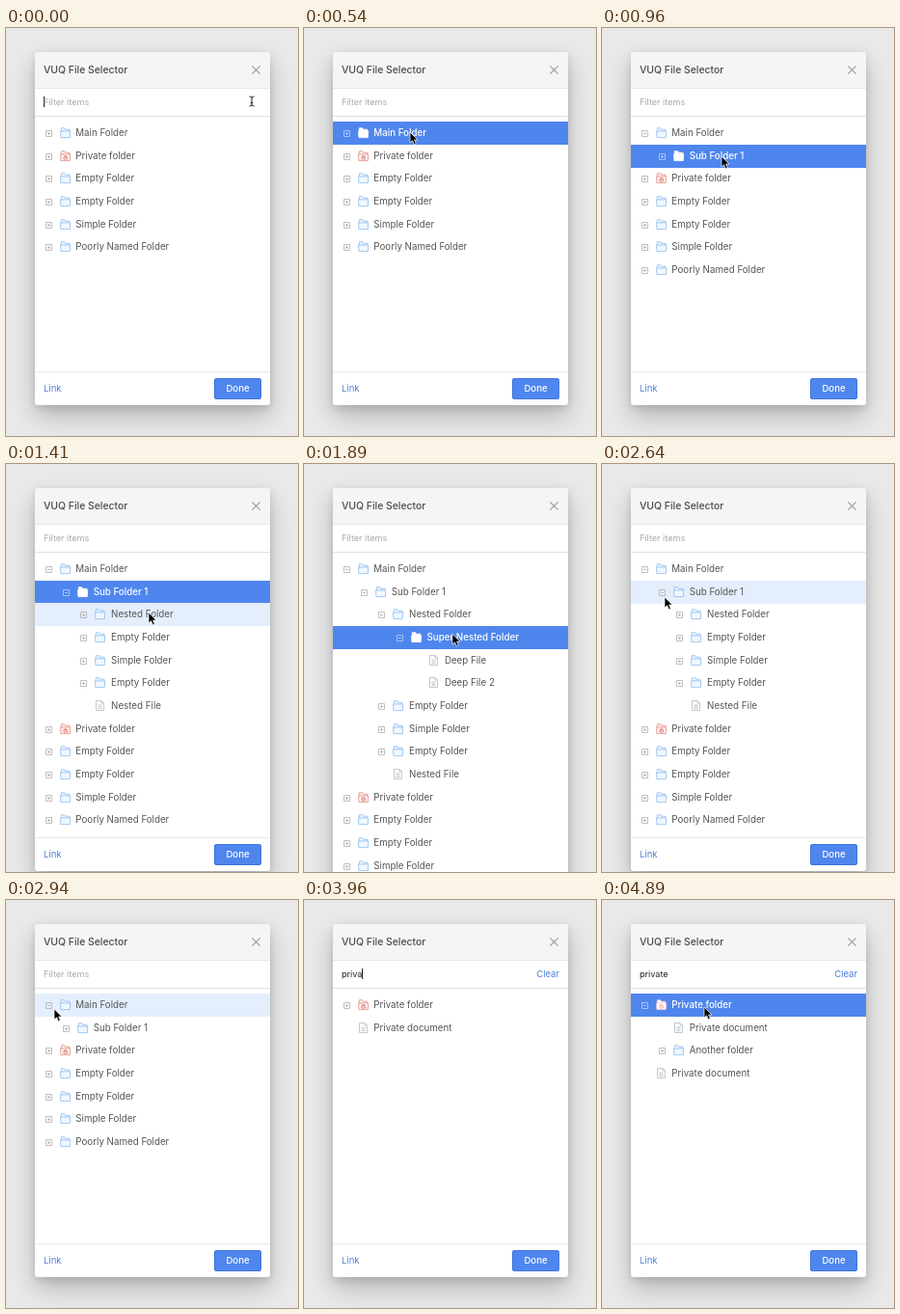
These frames come from a looping animation (303x423 px, 4.92 s). An HTML page:

```html
<!DOCTYPE html>
<html lang="en">
<head>
<meta charset="utf-8">
<title>File selector</title>
<style>
  html, body { margin: 0; width: 100%; height: 100%; overflow: hidden; background: #e9e9e9; }
  body { position: relative; font: 9.75px Inter, "Open Sans", sans-serif; color: #545454; cursor: default; }
  div, svg { position: absolute; }
  span { white-space: pre; }
  #panel {
    left: 30px; top: 25px; width: 244px; background: #fff; border-radius: 3px;
    box-shadow: 0 12px 26px rgba(0,0,0,.21), 0 3px 8px rgba(0,0,0,.12);
  }
  #head {
    left: 30px; top: 25px; width: 235px; height: 37px; padding-left: 9px; box-sizing: content-box;
    background: #f5f5f5; border-bottom: 1px solid #e6e6e6; border-radius: 3px 3px 0 0;
    font-size: 10.4px; font-weight: 500; line-height: 37px; color: #4c4c4c;
  }
  #field {
    left: 30px; top: 63px; width: 235px; height: 28px; padding-left: 9px;
    border-bottom: 1px solid #e1e1e1; line-height: 27px; font-size: 9.1px; color: #222;
  }
  #field .hint { color: #a9a9a9; }
  #caret { display: inline-block; width: 1px; height: 11px; margin-right: -1px; vertical-align: -2px; background: #222; }
  .link { color: #4a80d8; font-size: 9.5px; }
  #clear { right: 9px; top: 0; }
  .row { left: 30px; width: 244px; height: 24px; line-height: 23px; }
  .row span { position: absolute; top: 0; }
  .row.hover { background: #e4eefd; }
  .row.on { background: #4f86ee; color: #fff; font-weight: 500; }
  #foot { left: 30px; width: 244px; height: 34px; border-top: 1px solid #e8e8e8; }
  #foot .link { left: 9px; top: 0; line-height: 34px; }
  #done {
    left: 186px; top: 6px; width: 47px; height: 20px; border: 1px solid #3f76df; border-radius: 2px;
    background: #4f86ee; color: #fff; font-size: 9.6px; font-weight: 500; line-height: 20px; text-align: center;
  }
  svg { overflow: visible; fill: none; }
</style>
</head>
<body>
<div id="panel"></div>
<div id="head">VUQ File Selector</div>
<svg style="left:255px;top:39px" width="9" height="9"><path d="M.3 .3L8.7 8.7M8.7 .3L.3 8.7" stroke="#999" stroke-width="1.1"/></svg>
<div id="field"></div>
<div id="list"></div>
<div id="foot"><div class="link">Link</div><div id="done">Done</div></div>
<svg id="arrow" width="9" height="13"><path d="M0 0V11L2.6 8.7L4.3 12.7L6.3 11.9L4.6 8H8Z" fill="#000" stroke="#fff" stroke-width=".7"/></svg>
<svg id="beam" width="1" height="1"><path d="M-2.5 -5Q0 -5 0 -3.6Q0 -5 2.5 -5M0 -4V4M-2.5 5Q0 5 0 3.6Q0 5 2.5 5M-1.3 1.6H1.3" stroke="#222"/></svg>
<script>
const LOOP = 4920, PITCH = 23.67, TOP = 97;
const $ = id => document.getElementById(id);

const dir = (name, ...kids) => ({ name, kids });
const file = name => ({ name });
const secret = { ...dir('Private folder', file('Private document'), dir('Another folder')), locked: true };
const tree = [
  dir('Main Folder',
    dir('Sub Folder 1',
      dir('Nested Folder',
        dir('Super Nested Folder', file('Deep File'), file('Deep File 2'))),
      dir('Empty Folder'), dir('Simple Folder'), dir('Empty Folder'),
      file('Nested File'))),
  secret,
  dir('Empty Folder'), dir('Empty Folder'), dir('Simple Folder'), dir('Poorly Named Folder')
];
const matches = [secret, file('Private document')];

// time, action, value
const events = [
  [0, 'focus'],
  [510, 'select', 'Main Folder'], [570, 'toggle', 'Main Folder'],
  [960, 'select', 'Sub Folder 1'], [1020, 'toggle', 'Sub Folder 1'],
  [1500, 'select', 'Nested Folder'], [1560, 'toggle', 'Nested Folder'],
  [1800, 'select', 'Super Nested Folder'], [1860, 'toggle', 'Super Nested Folder'],
  [2220, 'toggle', 'Super Nested Folder'], [2430, 'toggle', 'Nested Folder'],
  [2760, 'toggle', 'Sub Folder 1'], [3030, 'toggle', 'Main Folder'],
  [3540, 'focus'],
  [3750, 'type', 'p'], [3810, 'type', 'r'], [3840, 'type', 'i'], [3900, 'type', 'v'],
  [3960, 'type', 'a'], [4050, 'type', 't'], [4080, 'type', 'e'],
  [4560, 'select', 'Private folder'], [4620, 'toggle', 'Private folder']
];

// start, end, x, y of each pointer move
const moves = [
  [60, 480, 110, 108], [720, 810, 124, 133], [1110, 1410, 148, 154], [1620, 1740, 154, 176],
  [1890, 2010, 125, 183], [2040, 2190, 101, 182], [2280, 2400, 83, 160], [2460, 2520, 68, 141],
  [2580, 2640, 65, 138], [2820, 2940, 50, 113], [3150, 3480, 110, 77], [4320, 4410, 92, 108],
  [4740, 4770, 104, 110], [4860, 4890, 106, 111]
];

function pointerAt(t) {
  let x = 255, y = 76;
  for (const [start, end, toX, toY] of moves) {
    if (t < start) break;
    const p = Math.min(1, (t - start) / (end - start));
    const k = p * p * (3 - 2 * p);
    x += (toX - x) * k;
    y += (toY - y) * k;
  }
  return { x, y, hidden: t >= 3750 && t < 4320 };
}

function stateAt(t) {
  const s = { open: new Set(), selected: '', text: '', focus: false };
  for (const [time, action, value] of events) {
    if (time > t) break;
    if (action === 'focus') s.focus = true;
    if (action === 'type') s.text += value;
    if (action === 'select') { s.selected = value; s.focus = false; }
    if (action === 'toggle' && !s.open.delete(value)) s.open.add(value);
  }
  return s;
}

function flatten(nodes, open, depth = 0) {
  return nodes.flatMap(node => [
    { node, depth },
    ...(node.kids && open.has(node.name) ? flatten(node.kids, open, depth + 1) : [])
  ]);
}

const svg = (x, y, body) => `<svg style="left:${x}px;top:${y}px" width="12" height="12">${body}</svg>`;

function toggleIcon(isOpen, on) {
  return `<path d="M.5 .5H6.5V6.5H.5ZM2 3.5H5${isOpen ? '' : 'M3.5 2V5'}" stroke="${on ? '#b9d0fa' : '#b0b0b0'}" stroke-width=".8"/>`;
}

function nodeIcon(node, on) {
  if (!node.kids) {
    return `<path d="M1.5 .5H7L9.5 3V10.5H1.5Z" fill="#fff" stroke="#b3bac1" stroke-width=".8"/>
      <path d="M7 .5V3H9.5M3.3 5H7.6M3.3 6.8H7.6M3.3 8.6H7.6" stroke="#a5b4c2" stroke-width=".7"/>`;
  }
  const line = node.locked ? (on ? '#f6c9c8' : '#e68f85') : on ? '#fff' : '#8dbbee';
  const fill = on ? '#fff' : node.locked ? '#fdf0ee' : '#eff7ff';
  const lock = node.locked
    ? `<path d="M4 6.8H7.4V9H4ZM4.7 6.8V5.8H6.7V6.8" stroke="${on ? '#e9a09a' : '#dd7167'}" stroke-width=".8"/>` : '';
  return `<path d="M1.3 4V.7H4.6L5.6 2.2H9.9V4" fill="${fill}" stroke="${line}" stroke-width=".8"/>
    <path d="M.5 3.9H10.7L10.3 10.6H.9Z" fill="${fill}" stroke="${line}" stroke-width=".8"/>${lock}`;
}

function rowHtml({ node, depth }, i, s, hover) {
  const on = node.name === s.selected && !!node.kids;
  const shift = depth * 18.4;
  const style = on ? ' on' : i === hover ? ' hover' : '';
  return `<div class="row${style}" style="top:${Math.round(TOP + i * PITCH)}px">
    ${node.kids ? svg(10.5 + shift, 8.5, toggleIcon(s.open.has(node.name), on)) : ''}
    ${svg(25.5 + shift, 6.3, nodeIcon(node, on))}
    <span style="left:${42.3 + shift}px">${node.name}</span></div>`;
}

function fieldHtml(s) {
  const caret = s.focus ? '<span id="caret"></span>' : '';
  return s.text
    ? `<span>${s.text}</span>${caret}<div id="clear" class="link" style="right:9px">Clear</div>`
    : `${caret}<span class="hint">Filter items</span>`;
}

function draw(s, hover) {
  const rows = flatten(s.text.length > 1 ? matches : tree, s.open);
  const footY = Math.max(356, Math.round(TOP + rows.length * PITCH + 5.5));
  $('list').innerHTML = rows.map((row, i) => rowHtml(row, i, s, hover)).join('');
  $('field').innerHTML = fieldHtml(s);
  $('foot').style.top = footY + 'px';
  $('panel').style.height = footY + 35 - 25 + 'px';
}

let drawn = '';
function frame() {
  const t = performance.now() % LOOP;
  const { x, y, hidden } = pointerAt(t);
  const inField = y < 91;
  const hover = hidden || y < TOP ? -1 : Math.floor((y - TOP) / PITCH);
  const key = events.filter(e => e[0] <= t).length + ':' + hover;
  if (key !== drawn) {
    draw(stateAt(t), hover);
    drawn = key;
  }
  for (const id of ['arrow', 'beam']) {
    const shown = !hidden && inField === (id === 'beam');
    $(id).style.display = shown ? 'block' : 'none';
    $(id).style.transform = `translate(${x}px, ${y}px)`;
    $(id).style.left = $(id).style.top = '0';
  }
  requestAnimationFrame(frame);
}
frame();
</script>
</body>
</html>
```
